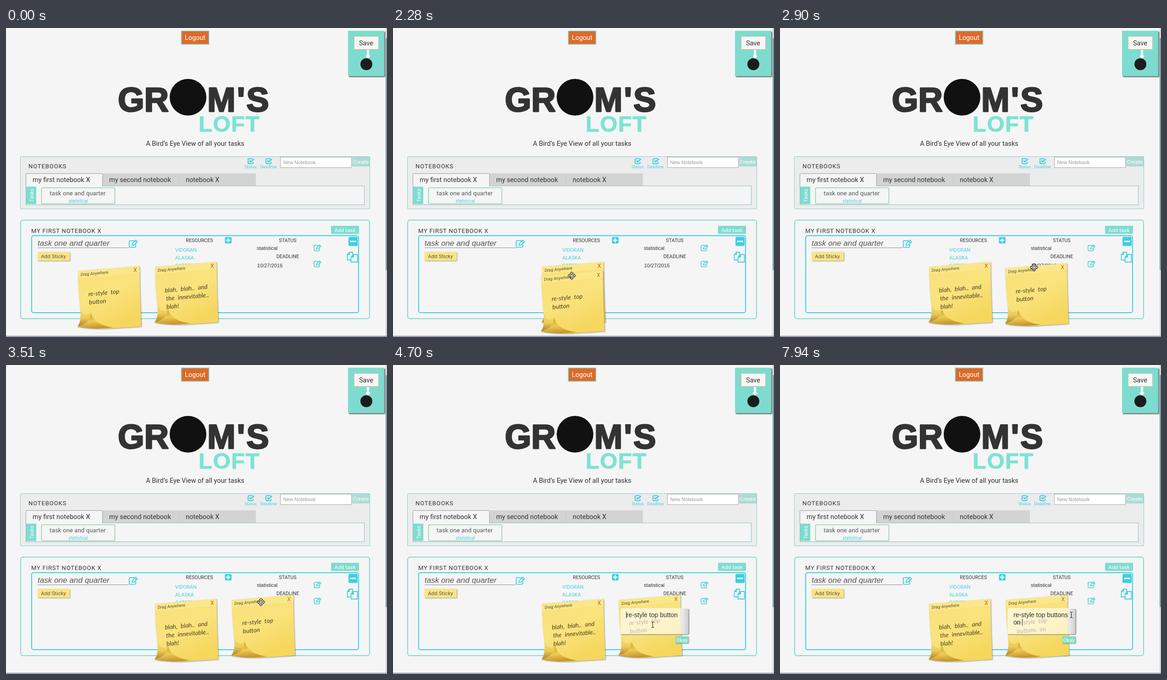
An HTML page that plays this animation: 831 by 674 pixels, repeating every 8 s.

```html
<!DOCTYPE html>
<html lang="en">
<head>
<meta charset="utf-8">
<title>Task board</title>
<style>
html, body { margin: 0; width: 100%; height: 100%; overflow: hidden; background: #f5f5f5; }
svg { display: block; width: 831px; height: 674px; }
text { font-family: Roboto, sans-serif; fill: #333; white-space: pre; }
.arial { font-family: "Liberation Sans", Arial, sans-serif; }
.mid { text-anchor: middle; }
.white { fill: #fff; }
.cyan { fill: #45cfe0; }
.logo { font-family: "Liberation Sans", Arial, sans-serif; font-weight: bold; stroke-linejoin: round; }
.tab { font-size: 14.5px; }
.caps { font-size: 13px; }
.head { font-size: 10.7px; text-anchor: middle; }
.link { font-size: 11px; fill: #45cfe0; }
.hand { font-family: Lato, sans-serif; font-style: italic; font-size: 13.5px; fill: #4a4126; word-spacing: 4px; }
.drag { font-style: italic; font-size: 9.3px; fill: #5a5029; }
.teal { fill: #7ddccf; }
.shadow { filter: drop-shadow(1px 1px 1px #0006); }
</style>
</head>
<body>
<svg viewBox="0 0 831 674">
  <defs>
    <linearGradient id="paper" x1="0" y1="0" x2=".5" y2="1">
      <stop offset="0" stop-color="#f8e07a"/><stop offset=".55" stop-color="#fae37c"/><stop offset="1" stop-color="#f5d75e"/>
    </linearGradient>
    <linearGradient id="curl" x1="0" y1="0" x2="0" y2="1">
      <stop offset="0" stop-color="#f8e07a"/><stop offset=".6" stop-color="#eccb58"/><stop offset="1" stop-color="#b08028"/>
    </linearGradient>
    <linearGradient id="fold" x1=".2" y1="0" x2=".4" y2="1">
      <stop offset="0" stop-color="#cf9a1e"/><stop offset=".55" stop-color="#eeca55"/><stop offset="1" stop-color="#c4942f"/>
    </linearGradient>
    <linearGradient id="glass" x1="0" x2="1">
      <stop offset="0" stop-color="#fff" stop-opacity=".65"/><stop offset=".88" stop-color="#fff" stop-opacity=".6"/>
      <stop offset=".91" stop-color="#e4e4e4" stop-opacity=".8"/><stop offset="1" stop-color="#c6c6c6" stop-opacity=".9"/>
    </linearGradient>
    <g id="note">
      <g class="shadow">
        <path fill="url(#paper)" d="M157 530 L291 519 Q292 585 295 651 L232 655 Q190 658 156 651 Q165 640 162 612 Q157 570 157 530Z"/>
        <path fill="#fcea90" opacity=".7" d="M157 530 L291 519 L292 534 L158 546Z"/>
        <path fill="url(#curl)" d="M162 604 C164 625 174 630 185 621 C184 640 172 648 156 651 Q166 640 162 604Z"/>
        <path fill="url(#fold)" d="M185 621 C190 639 206 650 234 653 C208 657 178 656 156 651 C174 646 184 638 185 621Z"/>
      </g>
      <text class="drag" transform="translate(163 541) rotate(-5)">Drag Anywhere</text>
    </g>
    <g id="check" fill="none" stroke="#3fcfe0" stroke-width="2">
      <path d="M11 1 H3 Q1 1 1 3 V10 Q1 12 3 12 H10 Q12 12 12 10 V8"/><path d="M4 5 L7 8 L14 1.5" stroke-width="2.5"/>
    </g>
    <g id="edit" fill="none" stroke="#3fcfe0" stroke-width="1.5">
      <path d="M11 2 H3 Q1 2 1 4 V12 Q1 14 3 14 H11 Q13 14 13 12 V9"/><path d="M6 10 L7 7 L13 1 L16 4 L10 10Z M11 3 L14 6"/>
    </g>
  </defs>

  <rect width="831" height="674" fill="#f5f5f5"/>
  <path d="M829.5 0 V672" stroke="#d2d2d2" stroke-width="3"/>
  <path d="M829.5 22 V528" stroke="#7b9daa" stroke-width="3"/>
  <path d="M0 672.5 H831" stroke="#62628f" stroke-width="1.6"/>

  <rect x="382.5" y="6.5" width="60" height="29" fill="#dc6b2b" stroke="#82cfc3" stroke-width="1.6"/>
  <text class="mid white" x="412.5" y="26" font-size="14.5">Logout</text>

  <rect class="teal" x="746" y="6" width="79" height="99" rx="1" style="filter:drop-shadow(2px 2px 1px #0009)"/>
  <rect x="759.5" y="18.5" width="53" height="28" fill="#f7f7f5" stroke="#e6bb91"/>
  <text class="mid" x="785.5" y="38" font-size="14.5">Save</text>
  <path d="M787 48 H792 V60 H795 L789.5 68 L784 60 H787Z" fill="#fff"/>
  <circle cx="786" cy="79" r="13" fill="#1c1c1c"/>

  <text class="logo" x="244" y="182" font-size="74" style="fill:#333;stroke:#333;stroke-width:3">GR</text>
  <circle cx="397" cy="151" r="40" fill="#111"/>
  <text class="logo" x="439" y="182" font-size="74" letter-spacing="3" style="fill:#333;stroke:#333;stroke-width:3">M'S</text>
  <text class="logo" x="420" y="226" font-size="49" letter-spacing="1.5" style="fill:#7de3d4;stroke:#7de3d4;stroke-width:1">LOFT</text>
  <text class="mid" x="412.5" y="257" font-size="14.5">A Bird’s Eye View of all your tasks</text>

  <rect x="31.5" y="280.5" width="762" height="114" rx="1" fill="#ececec" stroke="#86cdc4"/>
  <text class="caps" x="49" y="306" letter-spacing=".9">NOTEBOOKS</text>
  <use href="#check" x="527" y="284"/><use href="#check" x="566" y="284"/>
  <text class="mid cyan" x="533.5" y="306" font-size="9.3">Status</text>
  <text class="mid cyan" x="572.5" y="306" font-size="9.3">Deadline</text>
  <rect x="598.5" y="281.5" width="155" height="23" fill="#fff" stroke="#a5a5a5"/>
  <text class="arial" x="604.5" y="297" font-size="10.8" style="fill:#999">New Notebook</text>
  <rect x="755" y="281" width="38" height="21" fill="#addbd3"/>
  <text class="mid white" x="774" y="296" font-size="11.8">Create</text>

  <rect x="211" y="317" width="334" height="28" rx="2" fill="#d3d3d3"/>
  <path d="M377.5 318 V345" stroke="#cacaca"/>
  <rect x="43.5" y="344.5" width="738" height="41" fill="#f5f5f5" stroke="#8dbdc8"/>
  <path d="M43.5 345 V319 Q43.5 317.5 45 317.5 H209 Q210.5 317.5 210.5 319 V345" fill="#f5f5f5" stroke="#8f9d9f"/>
  <text class="tab" x="58" y="336">my first notebook X</text>
  <text class="tab" x="225" y="336">my second notebook</text>
  <text class="tab" x="392" y="336">notebook X</text>
  <rect class="teal" x="44" y="346" width="22" height="38"/>
  <text class="mid white" transform="translate(60 365) rotate(-90)" font-size="11">Tasks</text>
  <rect x="77.5" y="348.5" width="160" height="35" rx="2" fill="#f5f5f5" stroke="#92cfa6" stroke-width="1.5"/>
  <text class="mid" x="156.5" y="365" font-size="13" letter-spacing=".15" style="fill:#555">task one and quarter</text>
  <text class="mid cyan" x="157.5" y="381" font-size="10" font-style="italic">statistical</text>

  <rect x="32" y="419" width="761" height="215" rx="5" fill="none" stroke="#80dccf" stroke-width="2"/>
  <text class="caps" x="55" y="447" letter-spacing=".8">MY FIRST NOTEBOOK X</text>
  <rect class="teal" x="709" y="431.5" width="61" height="17.5" rx="1"/>
  <text class="mid white" x="739.5" y="444.5" font-size="11.8">Add task</text>
  <rect x="56" y="453" width="713" height="168" rx="4" fill="none" stroke="#39d2e4" stroke-width="2"/>
  <text class="arial" x="69" y="475" font-size="17.1" font-style="italic" style="fill:#555">task one and quarter</text>
  <path d="M69 479.5 H268" stroke="#8b8b8b"/>
  <use href="#edit" transform="translate(267.5 461.5) scale(1.2)"/>
  <use href="#edit" x="671" y="472"/><use href="#edit" x="671" y="507"/>
  <rect class="shadow" x="69" y="488.5" width="70" height="19" rx="1" fill="#fae583"/>
  <text class="mid" x="103.5" y="502" font-size="11.4" letter-spacing=".1" style="fill:#555">Add Sticky</text>
  <text class="head" x="422" y="467">RESOURCES</text>
  <rect x="477.5" y="456" width="14.5" height="14" rx="2.5" fill="#3fcfe0"/>
  <path d="M480 463 H489.5 M484.7 458.3 V467.7" stroke="#fff" stroke-width="2.4"/>
  <text class="link" x="369" y="488">VIDORAN</text>
  <text class="link" x="369" y="505">ALASKA</text>
  <text class="link" x="369" y="522">CATORY</text>
  <text class="head" x="614.5" y="467">STATUS</text>
  <text class="arial" x="547" y="484" font-size="11">statistical</text>
  <text class="head" x="614.5" y="502">DEADLINE</text>
  <text class="arial" x="547.5" y="521.5" font-size="11.2">10/27/2016</text>
  <rect x="747" y="455.5" width="20" height="20" rx="3" fill="#3fcfe0"/>
  <path d="M750.5 465.5 H763.5" stroke="#fff" stroke-width="3"/>
  <g fill="#f5f5f5" stroke="#3fcfe0" stroke-width="1.8">
    <path d="M749 489 H756 V506 H744.5 V494Z M744.5 494 H749 V489"/>
    <path d="M758 494 H766.5 V510.5 H752.5 V499.5Z M752.5 499.5 H758 V494"/>
  </g>

  <g transform="translate(168 -9)">
    <use href="#note"/>
    <text x="278" y="532" font-size="12" style="fill:#c2551b">X</text>
    <g transform="translate(179 586) rotate(-5)">
      <text class="hand">blah, blah.. and</text>
      <text class="hand" x="1" y="18">the innevitable..</text>
      <text class="hand" y="36">blah!</text>
    </g>
  </g>

  <g id="dragged">
    <use href="#note"/>
    <text id="close" x="278" y="532" font-size="12">X</text>
    <g transform="translate(180 585) rotate(-5)">
      <text class="hand">re-style top</text>
      <text class="hand" y="18" id="noteEnd"></text>
    </g>
  </g>

  <g id="editor">
    <rect x="497" y="531" width="148" height="57" rx="3" fill="url(#glass)"/>
    <path d="M498 588 H643 Q645.5 588 645.5 585 V533" fill="none" stroke="#777" stroke-opacity=".75" stroke-width="1.6"/>
    <path d="M497 587 V533 Q497 531 499 531 H643" fill="none" stroke="#fff" stroke-opacity=".6"/>
    <rect class="teal shadow" x="616" y="592" width="28.5" height="15" rx="1"/>
    <text class="mid white" x="630.3" y="604" font-size="11.5">Okay</text>
    <text class="arial" x="509" y="550" font-size="14" id="line1"></text>
    <text class="arial" x="509" y="566" font-size="14" id="line2"></text>
    <path id="caret" d="M0 -12 V2.5" stroke="#222"/>
  </g>

  <path id="arrow" fill="#fff" stroke="#000" d="M0 0 V16 L4 12.5 L6.5 18 L9 17 L6.5 11.5 H11.5Z"/>
  <path id="beam" fill="none" stroke="#222" stroke-width="1.1" d="M-3 -6 H-1 L0 -5 L1 -6 H3 M0 -5 V5 M-3 6 H-1 L0 5 L1 6 H3"/>
  <path id="move" fill="#fff" stroke="#222" stroke-width="1.1" stroke-linejoin="round"
    d="M0 -8.5 L3.5 -5 H1.3 V-1.3 H5 V-3.5 L8.5 0 L5 3.5 V1.3 H1.3 V5 H3.5 L0 8.5 L-3.5 5 H-1.3 V1.3 H-5 V3.5 L-8.5 0 L-5 -3.5 V-1.3 H-1.3 V-5 H-3.5Z"/>
</svg>
<script>
const LOOP = 8000, FRAME = 77, BLINK = 500;
const GRAB = 2110, FOCUS = 4400, CLICK = 5310;
const KEYSTROKES = [6460, 6940, 7780, 7860, 7940], TYPED = "s on ", FIRST_LINE_KEYS = 2;
const el = id => document.getElementById(id);

const linear = p => p;
const easeIn = p => p * p;
const easeOut = p => 1 - (1 - p) ** 1.4;

function progress(t, start, end) {
  if (t < start) return 0;
  const gaps = Math.round((end - start) / FRAME);
  return (Math.floor(Math.min(1, (t - start) / (end - start)) * gaps) + 1) / (gaps + 1);
}

const noteLegs = [
  { start: GRAB, end: 2360, to: [222, 14] },
  { start: 2590, end: 2900, to: [334.5, -6], ease: easeOut },
  { start: 2980, end: 3130, to: [335.5, -17.5] }
];
const pointerLegs = [
  { start: 1040, end: 1200, to: [232, 576] },
  { start: 1340, end: 1570, to: [214, 532] },
  { start: 1730, end: 1820, to: [212.5, 535.5] },
  { start: GRAB, end: 2360, to: [449, 542] },
  { start: 2590, end: 2900, to: [554, 522], ease: easeOut },
  { start: 2980, end: 3130, to: [555, 511] },
  { start: 3510, end: 3670, to: [565, 567], ease: easeIn },
  { start: 4700, end: 5160, to: [635.5, 545], ease: easeIn }
];

function travel(t, from, legs) {
  return legs.reduce((point, { start, end, to, ease = linear }) => {
    const p = ease(progress(t, start, end));
    return point.map((value, axis) => value + (to[axis] - value) * p);
  }, from);
}

const place = (id, [x, y]) => el(id).setAttribute("transform", `translate(${x} ${y})`);
const show = (id, visible) => { el(id).style.display = visible ? "" : "none"; };

function drawEditor(t) {
  const typed = TYPED.slice(0, KEYSTROKES.filter(time => time <= t).length);
  const secondLine = typed.slice(FIRST_LINE_KEYS);
  el("noteEnd").textContent = "button" + typed;
  el("line1").textContent = "re-style top button" + typed.slice(0, FIRST_LINE_KEYS);
  el("line2").textContent = secondLine;
  el("editor").setAttribute("opacity", progress(t, 3990, FOCUS));

  const line = el(secondLine ? "line2" : "line1");
  const width = t < CLICK ? 0 : line.getComputedTextLength();
  place("caret", [509 + width, +line.getAttribute("y")]);
  const lastInput = [FOCUS, CLICK, ...KEYSTROKES].findLast(time => time <= t);
  show("caret", Math.floor((t - lastInput) / BLINK) % 2 === 0);
}

function drawPointer(t) {
  const kind = t < 1040 ? "" : t < 1200 ? "arrow" : t >= 1490 && t < 3590 ? "move" : "beam";
  for (const id of ["arrow", "beam", "move"]) show(id, id === kind);
  if (kind) place(kind, travel(t, [373, 666], pointerLegs));
}

function draw(t) {
  place("dragged", travel(t, [0, 0], noteLegs));
  el("close").style.fill = t < GRAB ? "#c2551b" : "#a9782b";
  drawEditor(t);
  drawPointer(t);
}

const start = performance.now();
function tick() {
  draw((performance.now() - start) % LOOP);
  requestAnimationFrame(tick);
}
tick();
</script>
</body>
</html>
```
